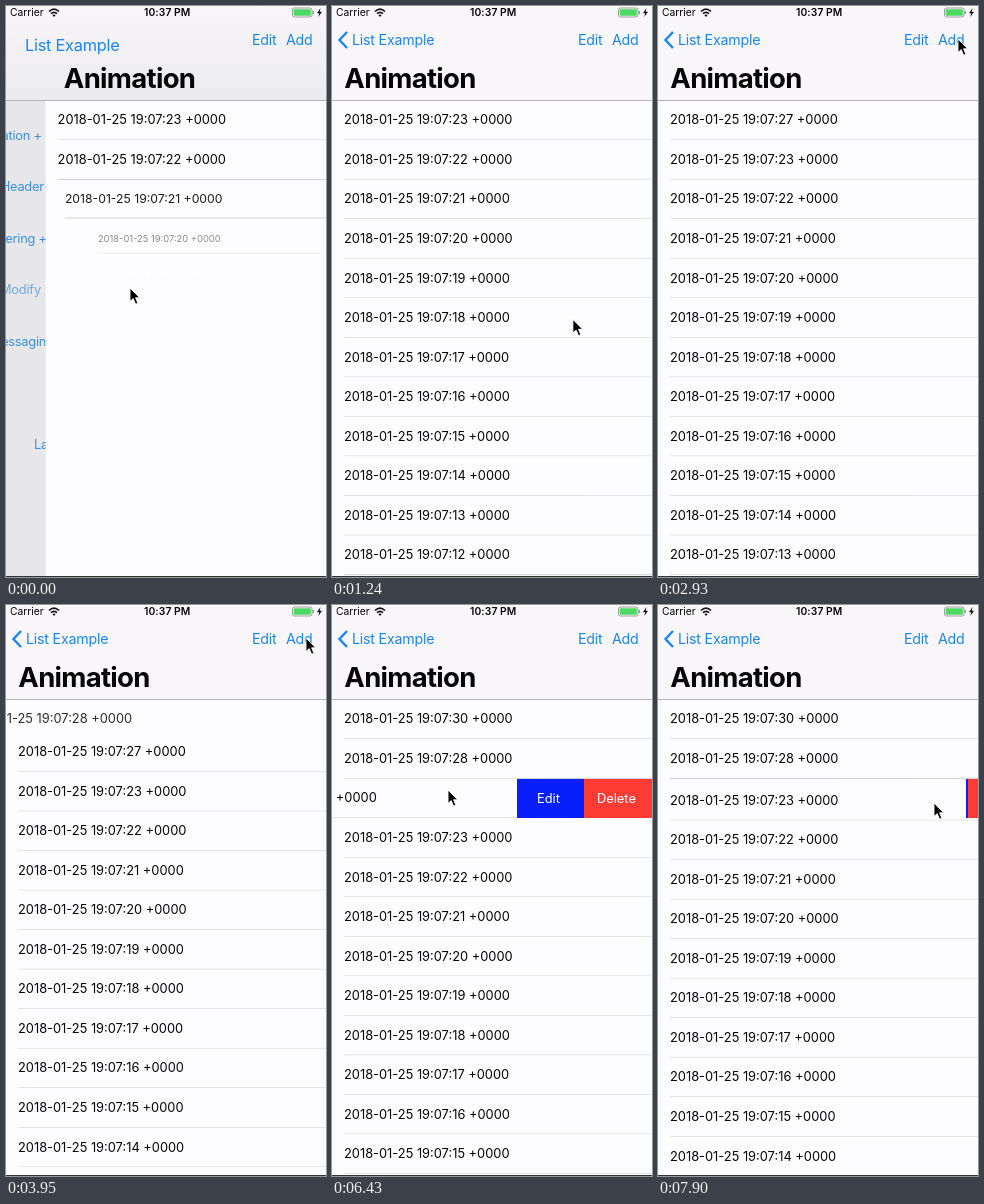
Write an HTML page that moves like this. It is 320 px wide and 571 px high and loops after 8 s.

```html
<!DOCTYPE html>
<html lang="en">
<head>
<meta charset="utf-8">
<title>List animation</title>
<style>
html, body { margin: 0; height: 100%; overflow: hidden; }
body { position: relative; width: 320px; height: 571px; background: #e7e6e9; color: #050505;
  font: 12.85px Inter, sans-serif; font-optical-sizing: none; }
div, span, svg { position: absolute; white-space: nowrap; }
#menu { width: 320px; height: 571px; color: #3b8fdf; }
#menu span { font-size: 12.8px; line-height: 20px; letter-spacing: -.2px; }
#page { width: 320px; height: 571px; background: #fdfcfe; }
.row { width: 320px; height: 39.53px; line-height: 39.53px; background: #fdfcfe; }
.row span { left: 12px; }
.row::after { content: ""; position: absolute; left: 12px; right: 0; bottom: 0; height: 1px; background: #d0cfd4; }
.action { top: 173.5px; height: 39.5px; line-height: 39.5px; color: #fff; overflow: hidden; }
#edit { background: #081efa; text-indent: 20px; }
#delete { background: #ff3b35; right: 0; text-indent: 13px; }
#bar { width: 320px; height: 94px; background: #f8f6f9; border-bottom: 1px solid #b6b5b9; }
#shade { width: 320px; height: 94px; background: linear-gradient(#f8f6f9, #ebeaec); }
.link { top: 24px; line-height: 20px; font-size: 14.2px; letter-spacing: -.2px; color: #1a86f0; }
#back { left: 20px; transform-origin: 0 50%; }
#title { left: 12.3px; top: 52px; font-size: 27.5px; font-weight: 700; line-height: 40px; letter-spacing: -.7px; }
.status { top: 0; font-size: 10.3px; line-height: 13px; }
#foot { top: 570px; width: 320px; height: 1px; background: #333; }
</style>
</head>
<body>
<div id="menu"></div>
<div id="page"></div>
<div id="edit" class="action">Edit</div>
<div id="delete" class="action">Delete</div>
<div id="bar">
  <div id="shade"></div>
  <span class="status" style="left:4px">Carrier</span>
  <span class="status" style="left:138px;font-weight:600;letter-spacing:.1px">10:37 PM</span>
  <svg width="320" height="50">
    <g fill="none" stroke="#111" stroke-width="1.7">
      <path d="M43 5.5Q48 .8 53 5.5M45 7.7Q48 5 51 7.7"/>
      <path id="chevron" d="M15 26L7.5 34L15 42" stroke="#1a86f0" stroke-width="2.4"/>
    </g>
    <path d="M46.3 9Q48 7.8 49.7 9L48 11ZM314.5 2L311 7.2H313.2L312.3 11L316 5.8H313.7Z" fill="#111"/>
    <rect x="286.5" y="2" width="19.5" height="9" rx="2" fill="none" stroke="#888" stroke-width=".8"/>
    <rect x="287.7" y="3.2" width="17.1" height="6.6" rx="1" fill="#4cd964"/>
    <path d="M307.2 5v3" stroke="#888" stroke-width="1.2"/>
  </svg>
  <span id="back" class="link">List Example</span>
  <span class="link" style="right:49.5px">Edit</span>
  <span class="link" style="right:13.5px">Add</span>
  <span id="title">Animation</span>
</div>
<div id="foot"></div>
<svg id="cursor" width="14" height="20" style="left:-1px;top:-1px">
  <path d="M1 1V14.5L4.2 11.6L6.6 17.2L8.9 16.2L6.6 10.8H10.8Z" fill="#000" stroke="#fff" stroke-width=".9"/>
</svg>
<script>
const LOOP = 8000, ROW = 39.53, TOP = 94.4, OPEN = 135;
const SECONDS = [30, 28, 27, ...Array.from({ length: 12 }, (_, i) => 23 - i)];
const INSERT_AT = [4490, 3700, 2580], DELETE_AT = 7611, CHANGE_MS = 340;
const REMOVED = 2;
// time, x, y
const POINTER = [
  [0, 124, 282], [760, 124, 282], [1250, 241, 313.5], [1400, 262, 265], [1640, 284, 155],
  [2050, 300, 33], [5150, 300, 33], [5650, 270, 190], [5980, 258, 205], [6100, 254, 202],
  [6400, 116, 185], [6600, 116, 185], [7150, 276, 198], [LOOP, 276, 198]
];
// label, side it is anchored to, offset, centre y
const MENU = [
  ["Animation +", "right", 200, 130], ["Header", "right", 198, 181], ["Filtering +", "right", 195, 233],
  ["Modify", "right", 201, 284], ["Messaging", "right", 188, 336], ["Layout", "left", 112, 439]
];

const $ = id => document.getElementById(id);
const clamp = u => Math.min(1, Math.max(0, u));
const smooth = u => u * u * (3 - 2 * u);
const span = (t, start, length) => smooth(clamp((t - start) / length));

$("menu").innerHTML = MENU.map(([label, side, offset, y]) =>
  `<span style="${side}:${offset}px;top:${y - 10}px;opacity:${label === "Modify" ? .7 : 1}">${label}</span>`).join("");
$("page").innerHTML = SECONDS.map(s =>
  `<div class="row"><span>2018-01-25 19:07:${String(s).padStart(2, "0")} +0000</span></div>`).join("");
const rows = [...document.querySelectorAll(".row")];

function drawPush(t) {
  const off = t < 560 ? 40 * Math.exp(-t / 125) * (1 - t / 560) : 0, k = off / 40;
  $("page").style.transform = `translateX(${off}px)`;
  $("menu").style.transform = `translateX(${-96 + .3 * off}px)`;
  $("title").style.transform = `translateX(${46 * k}px)`;
  $("back").style.transform = `translate(${-k}px, ${5 * k}px) scale(${1 + .15 * k})`;
  $("shade").style.opacity = k;
  $("chevron").style.opacity = 1 - k;
}

function drawRows(t, swipe, removal) {
  const inserted = INSERT_AT.map(start => span(t, start, CHANGE_MS));
  let slot = 0;
  rows.forEach((row, i) => {
    const added = i < 3 ? inserted[i] : 1;
    let x = 320 * (added - 1), scale = 1, alpha = added;
    if (i > 2) {
      alpha = clamp((t - (i - 7) * 50) / 112);
      scale = .5 + .5 * alpha;
    }
    if (i === REMOVED) {
      x -= swipe;
      alpha *= 1 - removal;
    }
    const y = TOP + ROW * (slot - (i > REMOVED ? removal : 0));
    row.style.transform = `translate(${x}px, ${y}px) scale(${scale})`;
    row.style.opacity = alpha;
    slot += added;
  });
}

function drawActions(swipe, removal) {
  const left = 320 - swipe + 131 * removal;
  const blue = 67 * swipe / OPEN * (1 - removal) ** 1.25;
  const shown = swipe > 0 && removal < 1 ? "block" : "none";
  $("edit").style.display = $("delete").style.display = shown;
  $("edit").style.left = left + "px";
  $("edit").style.width = blue + "px";
  $("delete").style.left = left + blue + "px";
}

function drawPointer(t) {
  const n = POINTER.findIndex(p => p[0] > t);
  const [t0, x0, y0] = POINTER[n - 1], [t1, x1, y1] = POINTER[n];
  const u = span(t, t0, t1 - t0);
  $("cursor").style.transform = `translate(${x0 + (x1 - x0) * u}px, ${y0 + (y1 - y0) * u}px)`;
}

function draw(now) {
  const t = now % LOOP;
  const swipe = OPEN * span(t, 6100, 300), removal = span(t, DELETE_AT, CHANGE_MS);
  drawPush(t);
  drawRows(t, swipe, removal);
  drawActions(swipe, removal);
  drawPointer(t);
}

const begin = performance.now();
function tick() {
  draw(performance.now() - begin);
  requestAnimationFrame(tick);
}
tick();
</script>
</body>
</html>
```
